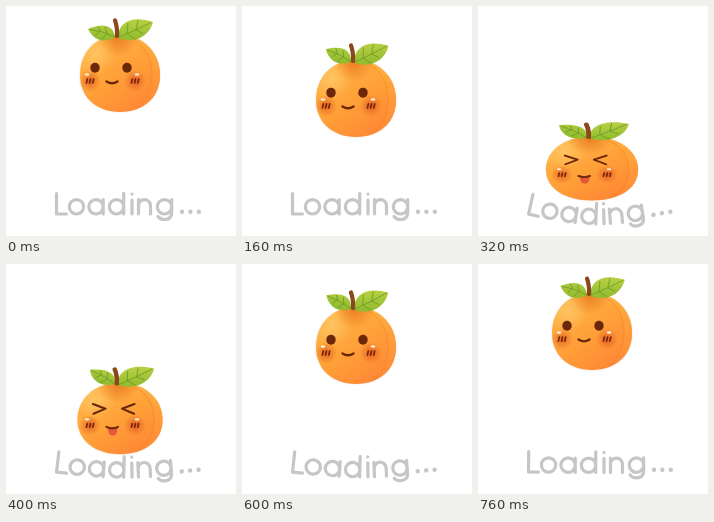
Write an HTML page with a canvas that moves like this. It is 230 px wide and 230 px high and loops after 0.8 s.

```html
<!DOCTYPE html>
<html lang="en">
<head>
<meta charset="utf-8">
<title>Loading</title>
<style>
html, body { margin: 0; width: 100%; height: 100%; overflow: hidden; background: #fff; }
canvas { display: block; width: 100vw; height: 100vh; }
</style>
</head>
<body>
<canvas role="img" aria-label="Loading..."></canvas>
<script>
const SIZE = 230, LOOP = 800, STEP = 40;
const FALL_END = 240, DEEPEST = 345, RISE_START = 480;
const canvas = document.querySelector('canvas');
const ctx = canvas.getContext('2d');
const ratio = window.devicePixelRatio || 1;
canvas.width = canvas.height = SIZE * ratio;

// Bottom centre of the fruit at the top of its jump
const MID = 114, FLOOR = 106;
const BROWN = '#6b270a';

const BOWL = 'M7.2-7.2a7.2 7.2 0 1 0-14.4 0a7.2 7.2 0 1 0 14.4 0';
const LETTERS = [
  [55, 'M-4.5-20.3V0H5.5'],
  [70.5, BOWL],
  [90, BOWL + 'M7.2-14.4V0'],
  [110.5, BOWL + 'M7.2-20.6V0'],
  [126, 'M0-14V0M0-20v.1'],
  [138.5, 'M-6-14.4V0M-6-8.3a6 6 0 0 1 12 0V0'],
  [158.5, BOWL + 'M7.2-14.4V-1.5Q7.2 5.5 0 5.5Q-4.5 5.5-6.5 2.5']
];

const BODY = 'M112 29C134 28 154 44 154 69C154 91 138 106 114 106C90 106 74 91 74 69C74 46 90 30 112 29Z';
const CREASE = 'M114 30C134 31 146 48 146 68C146 84 140 97 130 103';
const LOBE = CREASE + 'C145 98 154 86 154 69C154 44 134 28 114 29Z';

function dropAt(t) {
  if (t <= FALL_END) return 71 * (t / FALL_END) ** 2.58;
  if (t < RISE_START) return 89.5 - 32 * ((t - DEEPEST) / 135) ** 2;
  return 57.5 * ((LOOP - t) / (LOOP - RISE_START)) ** 3;
}

// Height factor: flattened on landing, stretched on take-off
function heightAt(t) {
  const u = (t - 260) / 340;
  return u < 0 || u > 1 ? 1 : 1 - .23 * (1 - u) * Math.sin(2 * Math.PI * u);
}

// The text bends down on impact and once more, weaker, afterwards
function sagAt(t) {
  if (t <= FALL_END) return 0;
  const s = t - DEEPEST;
  return 10 * Math.exp(-s / 350) * Math.cos(Math.PI * s / 255) ** 2;
}

function fill(d, color) {
  ctx.fillStyle = color;
  ctx.fill(new Path2D(d));
}

function line(d, color, width) {
  ctx.strokeStyle = color;
  ctx.lineWidth = width;
  ctx.stroke(new Path2D(d));
}

function oval(x, y, rx, ry, color) {
  ctx.fillStyle = color;
  ctx.beginPath();
  ctx.ellipse(x, y, rx, ry, 0, 0, 2 * Math.PI);
  ctx.fill();
}

function shaded(gradient, ...colors) {
  colors.forEach((color, i) => gradient.addColorStop(i / (colors.length - 1), color));
  return gradient;
}

function glow(x, y, r, rgb, alpha) {
  return shaded(ctx.createRadialGradient(x, y, 0, x, y, r), `rgba(${rgb},${alpha})`, `rgba(${rgb},0)`);
}

function drawGlyph(x, d, width, sag) {
  const phase = Math.PI * Math.min(1, (x - 50) / 141);
  ctx.save();
  ctx.translate(x, 208 + sag * Math.sin(phase));
  ctx.rotate(sag * Math.PI / 141 * Math.cos(phase));
  line(d, '#c6c6c6', width);
  ctx.restore();
}

function drawText(sag) {
  for (const [x, d] of LETTERS) drawGlyph(x, d, 3.2, sag);
  for (let i = 0; i < 3; i++) drawGlyph(176 + 8.4 * i, 'M0-2.4v.1', 4.4, sag);
}

function drawLeaf(angle, shape, veins) {
  ctx.save();
  ctx.translate(110, 31);
  ctx.rotate(angle);
  ctx.translate(-110, -31);
  fill(shape, shaded(ctx.createLinearGradient(0, 13, 0, 35), '#b9d145', '#8fb92d'));
  line(veins, '#709f27', .9);
  ctx.restore();
}

function drawBody() {
  ctx.save();
  ctx.shadowColor = 'rgba(190,140,100,.3)';
  ctx.shadowBlur = 2 * ratio;
  fill(BODY, shaded(ctx.createLinearGradient(88, 38, 136, 106), '#ffb446', '#ff9f37', '#ff8537'));
  ctx.restore();
  fill(LOBE, shaded(ctx.createLinearGradient(0, 30, 0, 105), 'rgba(255,178,66,.7)', 'rgba(255,138,52,.6)'));
  line(CREASE, 'rgba(238,125,32,.45)', 1);
  fill(BODY, glow(90, 48, 20, '255,208,118', .6));
  fill(BODY, glow(112, 31, 20, '222,92,14', .6));
}

function drawCheek(x) {
  oval(x, 75, 12, 11, glow(x, 75, 11, '214,70,24', .65));
  for (let i = -1; i <= 1; i++) line(`M${x + i * 3.2 + .5} 73l-.9 4`, '#7a260c', 1.7);
}

function drawFace(laughing) {
  [84, 129].forEach(drawCheek);
  [81, 131].forEach(x => oval(x, 68.5, 2.4, 1.3, '#ffe9cf'));
  if (laughing) {
    line('M87 52L99.5 57L87.5 62.5M128.5 52L116 57L128 62.5', BROWN, 2.2);
    fill('M102 77.5H111.5Q111.5 86 106.8 86Q102 86 102 77.5Z', '#e4573a');
    line('M100.5 76.5Q106 79.5 112 76.5', BROWN, 2.2);
  } else {
    [89, 121].forEach(x => oval(x, 61.7, 4.7, 5, BROWN));
    line('M100.5 75.5Q106 79 111.5 75.5', BROWN, 2.4);
  }
}

function drawFruit(t) {
  const height = heightAt(t), width = 1 - .9 * (height - 1);
  const flap = .3 * Math.sin(Math.PI * t / LOOP);
  ctx.save();
  ctx.translate(MID, FLOOR + dropAt(t));
  ctx.scale(width, height);
  ctx.translate(-MID, -FLOOR);
  drawBody();
  drawLeaf(flap, 'M109 31C107 18 96 17 82 23C87 34 98 38 109 31Z',
    'M109 31Q97 25 84 23.5M101 27.5l-2-6M94 25l-2-4M101 27.5l-5 5M94 25l-4 4');
  drawLeaf(flap * -.2, 'M112 32C112 16 126 9 147 16C143 31 128 38 112 32Z',
    'M112 31.5Q126 26 145 16.5M121 27.5l1-10M130 24l2-9.5M121 27.5l8 5.5M130 24l7 3.5');
  line('M109 14.5Q111.5 21 111 30', '#8a481b', 4.2);
  // The face keeps its width while the body squashes
  ctx.translate(MID, 0);
  ctx.scale(1 / width, 1);
  ctx.translate(-MID, 0);
  drawFace(t > FALL_END && t <= 520);
  ctx.restore();
}

function frame(now) {
  const t = Math.floor((now % LOOP) / STEP) * STEP;
  ctx.setTransform(ratio, 0, 0, ratio, 0, 0);
  ctx.fillStyle = '#fff';
  ctx.fillRect(0, 0, SIZE, SIZE);
  ctx.lineCap = ctx.lineJoin = 'round';
  drawText(sagAt(t));
  drawFruit(t);
  requestAnimationFrame(frame);
}

requestAnimationFrame(frame);
</script>
</body>
</html>
```
